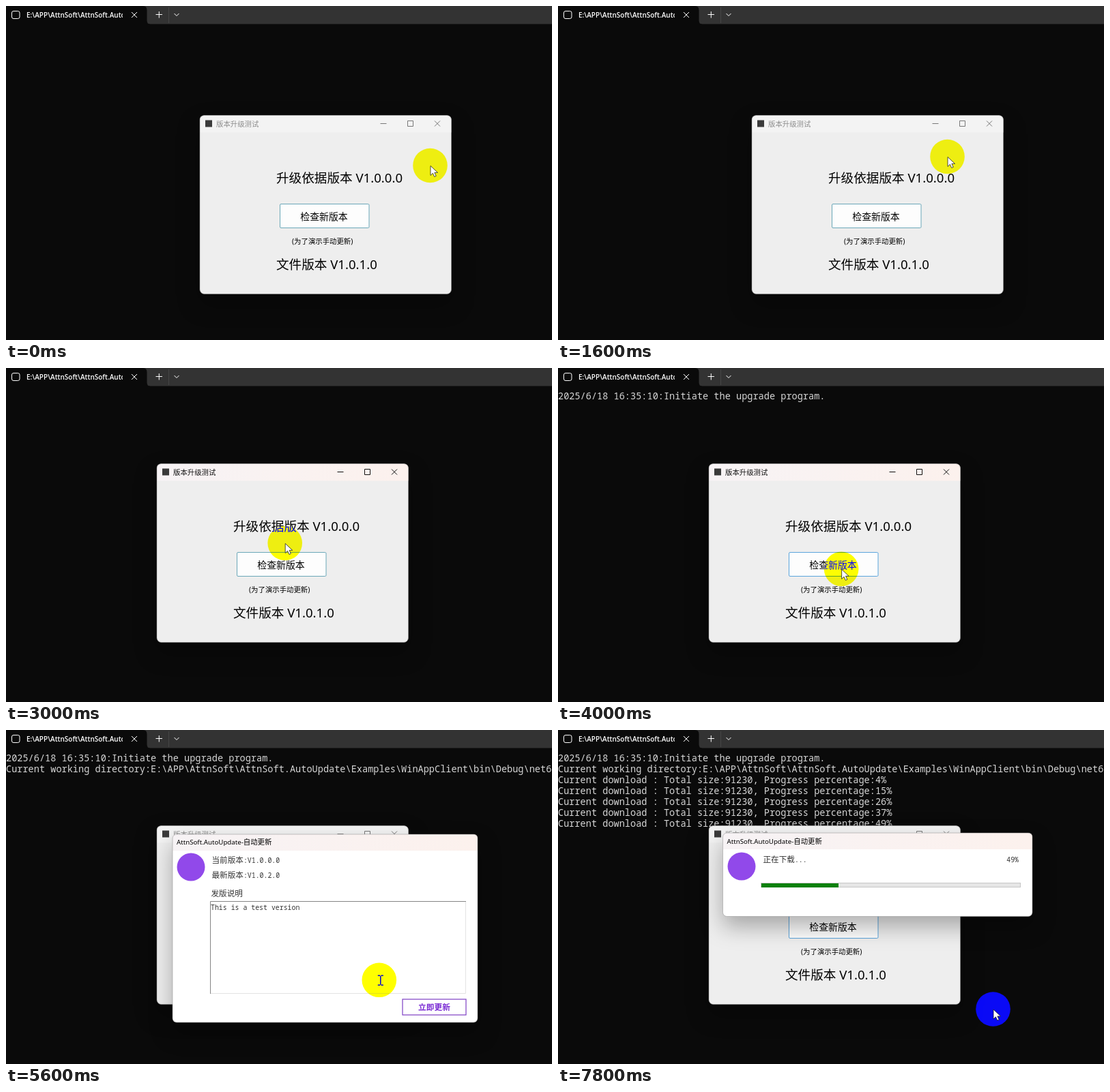
These frames come from a looping animation (800 by 490 pixels, 8000 ms). An HTML page:

```html
<!DOCTYPE html>
<html lang="zh-CN">
<head>
<meta charset="utf-8">
<title>版本升级测试</title>
<style>
html, body { margin: 0; width: 100%; height: 100%; overflow: hidden; background: #0a0a0a; }
svg { display: block; width: 100vw; height: 100vh; }
text { font-family: "Noto Sans", "Noto Sans CJK SC", "Noto Sans CJK", sans-serif; white-space: pre; }
.con { font: 500 13.6px "Noto Sans Mono", "DejaVu Sans Mono", monospace; fill: #d6d6d6; }
.tab { font: 600 10px "Open Sans", "Noto Sans", sans-serif; fill: #fff; }
.big { font-size: 18.6px; }
.mid { font-size: 13.9px; }
.small { font-size: 10.4px; }
.latin { font-size: 9.7px; }
.song { font: 300 11.6px "Noto Sans CJK SC", "Noto Sans CJK", sans-serif; fill: #333; }
.mono { font: 9.9px "Noto Sans Mono", "Liberation Mono", monospace; fill: #333; }
.line { fill: none; stroke: #fff; stroke-width: 1; }
.frame { fill: none; stroke: #8a8a8a; stroke-width: .5; }
.shadow { filter: drop-shadow(0 15px 16px rgba(0, 0, 0, .3)); }
#spot { mix-blend-mode: difference; fill: #00f; }
</style>
</head>
<body>
<svg viewBox="0 0 800 490">
  <defs>
    <linearGradient id="warm">
      <stop offset="0" stop-color="#f7f3f5"/><stop offset="1" stop-color="#fcf1ed"/>
    </linearGradient>
    <clipPath id="tabClip"><rect x="28" y="4" width="143" height="20"/></clipPath>
  </defs>

  <!-- terminal -->
  <rect width="800" height="490" fill="#0a0a0a"/>
  <rect width="800" height="26.5" fill="#333"/>
  <path d="M0 27V0H201Q206.500 0 206.500 6V21Q206.500 26.500 211 26.500V27Z" fill="#0a0a0a"/>
  <rect class="line" x="8.500" y="7.500" width="11.500" height="11" rx="2.500"/>
  <text class="tab" x="30" y="16.800" clip-path="url(#tabClip)">E:\APP\AttnSoft\AttnSoft.AutoUpdate</text>
  <path class="line" d="M184 9l8 8m0-8l-8 8M219.500 12.500h9.500M224.300 8v9.500M246.500 11l3.500 3.500 3.500-3.500"/>
  <path d="M238.500 2v23" stroke="#464646"/>
  <g id="console"></g>

  <!-- main window, in its own coordinates -->
  <g id="main">
    <rect class="shadow" width="368.500" height="262" rx="6.500" fill="#eee"/>
    <path id="bar" d="M0 25V6.500Q0 0 6.500 0H362Q368.500 0 368.500 6.500V25Z"/>
    <rect class="frame" width="368.500" height="262" rx="6.500"/>
    <rect x="8" y="7" width="10" height="10" fill="#3a3a3a"/>
    <text id="caption" class="small" x="24" y="16">版本升级测试</text>
    <path id="controls" fill="none" d="M264.500 12h9M304.500 8h8v8h-8zM344 8l8 8m0-8l-8 8"/>
    <text class="big" x="112" y="98">升级依据版本 V1.0.0.0</text>
    <rect id="check" x="117.500" y="130" width="130.500" height="35" rx="1.500" fill="#fdfdfd"/>
    <text class="mid" x="182" y="153.500" text-anchor="middle">检查新版本</text>
    <text class="small" x="135" y="188">(为了演示手动更新)</text>
    <text class="big" x="112" y="225.500">文件版本 V1.0.1.0</text>
  </g>

  <!-- update prompt -->
  <g id="prompt">
    <rect class="shadow" x="244" y="153" width="447" height="276" rx="6" fill="#fff"/>
    <path d="M244 177V159Q244 153 250 153H685Q691 153 691 159V177Z" fill="url(#warm)"/>
    <rect class="frame" x="244" y="153" width="447" height="276" rx="6"/>
    <text class="latin" x="250" y="168">AttnSoft.AutoUpdate-<tspan class="small">自动更新</tspan></text>
    <circle cx="271" cy="201" r="20.500" fill="#9149ea"/>
    <text class="song" x="301.500" y="195">当前版本<tspan class="mono">:V1.0.0.0</tspan></text>
    <text class="song" x="301.500" y="216.500">最新版本<tspan class="mono">:V1.0.2.0</tspan></text>
    <text class="song" x="300.500" y="243.500">发版说明</text>
    <path d="M673.500 251.500V386.500H299" fill="none" stroke="#e3e3e3"/>
    <path d="M299.500 387V251.500H674" fill="none" stroke="#858585"/>
    <text class="mono" x="300" y="263.500">This is a test version</text>
    <rect x="581" y="395" width="93" height="23" fill="#fff" stroke="#7d3fc4" stroke-width="1.200"/>
    <text x="627.500" y="411" text-anchor="middle" font-size="11.700" font-weight="700" fill="#7a2bd4">立即更新</text>
  </g>

  <!-- download progress -->
  <g id="progress">
    <rect class="shadow" x="241.500" y="151" width="453.500" height="122.500" rx="6" fill="#fff"/>
    <path d="M241.500 175V157Q241.500 151 247.500 151H689Q695 151 695 157V175Z" fill="url(#warm)"/>
    <rect class="frame" x="241.500" y="151" width="453.500" height="122.500" rx="6"/>
    <text class="latin" x="247.500" y="167">AttnSoft.AutoUpdate-<tspan class="small">自动更新</tspan></text>
    <circle cx="269" cy="200" r="20.500" fill="#9149ea"/>
    <text class="song" x="300.500" y="194">正在下载<tspan class="mono">...</tspan></text>
    <text id="percent" class="mono" x="675" y="194" text-anchor="end">0%</text>
    <rect x="297.500" y="224.500" width="380" height="6" fill="#e6e6e6" stroke="#c6c6c6"/>
    <rect id="fill" x="298" y="225" width="0" height="6" fill="#0c800c"/>
  </g>

  <!-- pointer with highlight -->
  <g id="pointer">
    <circle id="ring" r="5" fill="none" stroke="#f00" stroke-width="3"/>
    <path id="arrow" d="M.5 .5V14.500L3.900 11.300 6.200 16.500 8.700 15.400 6.400 10.400H11Z" fill="#fff" stroke="#222" stroke-width=".800"/>
    <path id="beam" d="M-2-6.500H1.300M2.700-6.500H6M2-6V7M-2 7.500H1.300M2.700 7.500H6" fill="none" stroke="#0000d8" stroke-width="1.500"/>
  </g>
</svg>
<script>
const LOOP = 8000, STEP = 100;
const $ = id => document.getElementById(id);
const make = tag => document.createElementNS("http://www.w3.org/2000/svg", tag);

// the highlight must blend with everything beneath it
const spot = make("circle");
spot.id = "spot";
spot.setAttribute("r", 25.3);
$("pointer").before(spot);

// time, x, y
const windowPath = [[2000, 284, 160.5], [2200, 253, 156.5], [2600, 221, 140.5]];
const pointerPath = [
  [0, 621.5, 234], [100, 623, 238], [500, 654, 305], [900, 679, 351], [1100, 676, 346],
  [1500, 590, 240], [1900, 512, 164], [2000, 512, 164], [2200, 481, 161], [2600, 449, 144],
  [2700, 449, 145], [2800, 440, 173], [3000, 408.7, 257], [3400, 413, 284], [3800, 415, 296],
  [4600, 415.5, 291.7], [5300, 419, 296], [5800, 632, 414], [6200, 637.5, 409.5]
];
// time, percent
const percents = [[6700, 4], [7000, 15], [7300, 26], [7500, 37], [7800, 49]];
const log = [
  [4000, "2025/6/18 16:35:10:Initiate the upgrade program."],
  [4100, "Current working directory:E:\\APP\\AttnSoft\\AttnSoft.AutoUpdate\\Examples\\WinAppClient\\bin\\Debug\\net6.0"],
  ...percents.map(([t, p]) => [t, `Current download : Total size:91230, Progress percentage:${p}%`])
];
const presses = [[2000, 2600], [3800, 4000], [6100, 6300]];

const rows = log.map(([, line], i) => {
  const row = make("text");
  row.setAttribute("class", "con");
  row.setAttribute("y", 46.3 + i * 15.9);
  row.textContent = line;
  $("console").append(row);
  return row;
});

function along(path, t) {
  const i = path.findIndex(p => p[0] > t);
  if (i === 0) return path[0].slice(1);
  if (i < 0) return path[path.length - 1].slice(1);
  const [t0, x0, y0] = path[i - 1], [t1, x1, y1] = path[i];
  const k = (t - t0) / (t1 - t0);
  return [x0 + (x1 - x0) * k, y0 + (y1 - y0) * k];
}

const show = (el, on) => { el.style.display = on ? "" : "none"; };
const move = (el, [x, y]) => el.setAttribute("transform", `translate(${x} ${y})`);

function draw(t) {
  rows.forEach((row, i) => show(row, t >= log[i][0]));

  const active = t >= 2000 && t < 4500;
  move($("main"), along(windowPath, t));
  $("bar").setAttribute("fill", active ? "url(#warm)" : "#f3f3f3");
  $("caption").setAttribute("fill", active ? "#111" : "#8c8c8c");
  $("controls").setAttribute("stroke", active ? "#111" : "#777");
  $("check").setAttribute("stroke", t >= 3200 ? "#5ba5dc" : "#6aa7b8");

  show($("prompt"), t >= 4500 && t < 6500);
  show($("progress"), t >= 6500);
  const done = percents.filter(p => t >= p[0]).pop();
  $("percent").textContent = (done ? done[1] : 0) + "%";
  $("fill").setAttribute("width", 113 * Math.min(1, Math.max(0, (t - 6700) / 1100)));

  const at = along(pointerPath, t);
  move(spot, at);
  move($("pointer"), at);
  const editing = t >= 4500 && t < 6500 && at[1] > 251 && at[1] < 387;
  show($("beam"), editing);
  show($("arrow"), !editing);
  show($("ring"), presses.some(([a, b]) => t >= a && t < b));
}

function tick() {
  const t = performance.now() % LOOP;
  draw(Math.floor(t / STEP) * STEP);
  requestAnimationFrame(tick);
}
tick();
</script>
</body>
</html>
```
